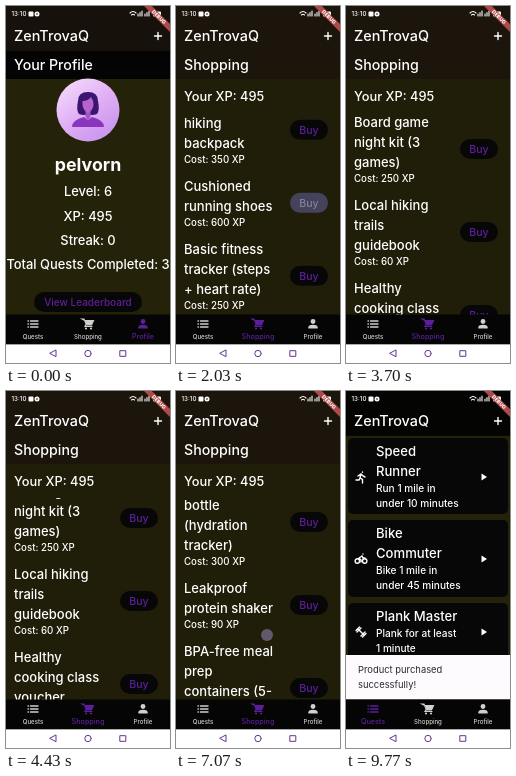
Write an HTML page with a canvas that moves like this. It is 164 by 357 pixels and loops after 9.81 s.

```html
<!DOCTYPE html>
<html lang="en">
<head>
<meta charset="utf-8">
<title>Quest app</title>
<style>
html, body { margin: 0; width: 100%; height: 100%; overflow: hidden; background: #000; }
canvas { display: block; width: 164px; height: 357px; }
</style>
</head>
<body>
<canvas id="stage"></canvas>
<script>
const W = 164, H = 357, LOOP = 9810;
const WHITE = '#fff', PURPLE = '#5c1f9a', BODY = '#201e08', BAR = '#1c150c', DARK = '#080707';
const SHOP_AT = 620, BUY_AT = 8340, QUESTS_AT = 9100;

const products = [
  ['Gratitude|journal & pen|set', 120],
  ['Wireless noise-|canceling|headphones', 500],
  ['Mindfulness|prompt cards', 80],
  ['Lightweight|hiking|backpack', 350],
  ['Cushioned|running shoes', 600],
  ['Basic fitness|tracker (steps|+ heart rate)', 250],
  ['Board game|night kit (3|games)', 250],
  ['Local hiking|trails|guidebook', 60],
  ['Healthy|cooking class|voucher', 350],
  ['3-month habit|tracker planner', 95],
  ['1-month|language|learning|subscription', 170],
  ['Smart water|bottle|(hydration|tracker)', 300],
  ['Leakproof|protein shaker', 90],
  ['BPA-free meal|prep|containers (5-|pack)', 150]
];
// start, end, from, to, finger x, finger y
const flings = [
  [1104, 2300, 0, 252, 99, 303],
  [3000, 4200, 252, 475, 96, 290],
  [4600, 5800, 475, 668, 95, 285],
  [6250, 6900, 668, 890, 93, 290],
  [7040, 7800, 890, 941, 91, 250]
];
const taps = [[SHOP_AT, 82, 320], [BUY_AT, 133, 252], [QUESTS_AT, 27, 320]];

const canvas = document.getElementById('stage');
const c = canvas.getContext('2d');
const dpr = window.devicePixelRatio || 1;
canvas.width = W * dpr;
canvas.height = H * dpr;

const easeOut = p => 1 - (1 - Math.min(1, Math.max(0, p))) ** 3;

function rect(x, y, w, h, color, r = 0) {
  c.fillStyle = color;
  c.beginPath();
  c.roundRect(x, y, w, h, r);
  c.fill();
}
function disc(x, y, r, color) {
  c.fillStyle = color;
  c.beginPath();
  c.arc(x, y, r, 0, 7);
  c.fill();
}
function text(s, x, y, size, color = WHITE, align = 'left', weight = 500) {
  c.font = `${weight} ${size}px Inter, sans-serif`;
  c.textAlign = align;
  c.textBaseline = 'middle';
  c.fillStyle = color;
  c.fillText(s, x, y);
}
function path(d, x, y, color, lineWidth) {
  c.save();
  c.translate(x, y);
  c.lineCap = 'round';
  c.lineWidth = lineWidth;
  c.fillStyle = c.strokeStyle = color;
  const shape = new Path2D(d);
  lineWidth ? c.stroke(shape) : c.fill(shape);
  c.restore();
}

function statusBar() {
  text('13:10', 5.5, 8, 6.2);
  rect(22.5, 5.5, 5, 5, WHITE, 1);
  disc(31, 8, 2.5, WHITE);
  disc(31, 8, 0.8, DARK);
  path('M-3 -1Q0 -4 3 -1M-1.5 1Q0 -.5 1.5 1', 127, 8, WHITE, 1.1);
  path('M0 2V0M2 2V-1.5M4 2V-3', 132, 8, WHITE, 1.1);
  path('M0 2V0M2 2V-1.5M4 2V-3', 139, 8, WHITE, 1.1);
  rect(147, 5.5, 8, 5, WHITE, 1);
}

function debugRibbon() {
  c.save();
  c.translate(W, 0);
  c.rotate(Math.PI / 4);
  rect(-18.5, 12.8, 37, 5.6, '#b04a4a');
  text('DEBUG', 0, 15.8, 5, WHITE, 'center', 800);
  c.restore();
}

function header(bar, title, band) {
  rect(0, 0, W, 45, bar);
  text('ZenTrovaQ', 8, 30.5, 14.4);
  path('M-3.5 0H3.5M0 -3.5V3.5', 152, 30, WHITE, 1.4);
  if (title) {
    rect(0, 45, W, 28, band);
    text(title, 8, 59.5, 14.2);
  }
}

function avatar() {
  const glow = c.createLinearGradient(60, 75, 104, 134);
  glow.addColorStop(0, '#f3d9fb');
  glow.addColorStop(0.5, '#e0aef4');
  glow.addColorStop(1, '#c592ee');
  disc(82, 104, 31.5, glow);
  const robe = c.createLinearGradient(66, 108, 98, 122);
  robe.addColorStop(0, '#8a35c0');
  robe.addColorStop(1, '#3c1c88');
  path('M-9 8Q-12 4 -10 -5Q-10 -14 0 -14Q10 -14 10 -5Q12 4 9 8Q4 10 0 8Q-4 10 -9 8Z', 82, 100, '#3a1670');
  path('M-16 8Q-16 1 -4 -2L0 1L4 -2Q16 1 16 8Z', 82, 113, robe);
  path('M-2.5 5V12L0 15L2.5 12V5Z', 82, 99, '#a552c4');
  path('M-5.5 -4Q0 -4 3 -8Q5.5 -5 5.5 0Q4.5 6 0 8Q-4.5 6 -5.5 0Z', 82, 99, '#b862d0');
}

function profilePage() {
  rect(0, 45, W, 264, '#25220a');
  header('#16110b', 'Your Profile', '#050404');
  avatar();
  text('pelvorn', 82, 159.5, 17.8, WHITE, 'center', 700);
  ['Level: 6', 'XP: 495', 'Streak: 0', 'Total Quests Completed: 3'].forEach((s, i) =>
    text(s, 82, 186.5 + i * 24.3, 12.9, WHITE, 'center'));
  rect(28, 286, 108, 20, DARK, 10);
  text('View Leaderboard', 82, 296.5, 10, PURPLE, 'center');
}

function shoppingPage(t) {
  const xp = t < BUY_AT + 60 ? 495 : 345;
  let scroll = 0;
  for (const [start, end, from, to] of flings)
    if (t >= start) scroll = from + (to - from) * easeOut((t - start) / (end - start));
  rect(0, 45, W, 264, BODY);
  header(BAR, 'Shopping', BAR);
  text(`Your XP: ${xp}`, 8, 91.5, 12.8);
  c.save();
  c.beginPath();
  c.rect(0, 107, W, 202);
  c.clip();
  let y = 117 - scroll;
  for (const [name, cost] of products) {
    const lines = name.split('|'), n = lines.length;
    lines.forEach((line, i) => text(line, 8, y + i * 20 + 1.2, 13));
    text(`Cost: ${cost} XP`, 8, y + n * 20 - 2.7, 9.7);
    const off = cost > xp, mid = y + n * 10 - 3;
    rect(114, mid - 10, 38, 20, off ? '#45425c' : DARK, 10);
    text('Buy', 133, mid + 0.5, 10.6, off ? '#85819a' : PURPLE, 'center');
    y += n * 20 + 23;
  }
  c.restore();
}

function questCard(y, h, titles, notes, icon) {
  rect(2, y, 160, h, DARK, 5);
  titles.forEach((s, i) => text(s, 30, y + 14.3 + i * 20, 13.1));
  notes.forEach((s, i) => text(s, 30, y + 11.3 + titles.length * 20 + i * 15, 10.1));
  const mid = y + (titles.length > 1 ? 39 : 29);
  path(icon, 15, mid, WHITE, 1.4);
  path('M-2.5 -3.5L3 0L-2.5 3.5Z', 138, mid, WHITE);
}

function questsPage() {
  rect(0, 45, W, 264, '#242208');
  header('#040403');
  questCard(47, 76, ['Speed', 'Runner'], ['Run 1 mile in', 'under 10 minutes'],
    'M1.5 -5V-4.8M-3 -1L0 -3L2 -1L4 0M0 -3L-1 1L1.5 2.5V6M-1 1L-2 3L-5 3');
  questCard(129, 77, ['Bike', 'Commuter'], ['Bike 1 mile in', 'under 45 minutes'],
    'M-1.5 2A2.2 2.2 0 1 1 -5.9 2A2.2 2.2 0 1 1 -1.5 2M5.9 2A2.2 2.2 0 1 1 1.5 2A2.2 2.2 0 1 1 5.9 2M0 3V1L-2 -1L1 -3L2 -1H4M2 -5V-4.9');
  questCard(212, 92, ['Plank Master'], ['Plank for at least', '1 minute'],
    'M-2.5 -2.5L2.5 2.5M-5 -1.5L-1.5 -5M-4 0L0 -4M5 1.5L1.5 5M4 0L0 4');
}

function snackbar(t) {
  const shown = easeOut((t - BUY_AT - 60) / 250);
  if (!shown) return;
  c.save();
  c.beginPath();
  c.rect(0, 264, W, 44.5);
  c.clip();
  c.translate(0, 45 * (1 - shown));
  rect(0, 264, W, 45, '#fdfbfe');
  text('Product purchased', 12, 279.5, 9.4, '#2c2834', 'left', 400);
  text('successfully!', 12, 294, 9.4, '#2c2834', 'left', 400);
  c.restore();
}

function navBar(selected) {
  rect(0, 308.5, W, 30, '#060505');
  ['Quests', 'Shopping', 'Profile'].forEach((label, i) => {
    const x = 27 + i * 55, on = i === selected, color = on ? PURPLE : '#d2d0cc';
    if (i === 0) path('M-5 -3H-4.6M-2.5 -3H5M-5 0H-4.6M-2.5 0H5M-5 3H-4.6M-2.5 3H5', x, 318, color, 1.4);
    if (i === 1) {
      path('M-6 -5H-4L-1.5 1H3.5L5.5 -3.5H-3.3ZM-2 .5L-3 2.5H4', x, 318, color, 1.2);
      path('M-3 -3.5H5.5L3.5 1H-1.5Z', x, 318, color);
      disc(x - 2, 322.5, 1.1, color);
      disc(x + 3, 322.5, 1.1, color);
    }
    if (i === 2) {
      disc(x, 315.5, 2.4, color);
      path('M-4.7 4.5V3Q-4 .8 0 .8Q4 .8 4.7 3V4.5Z', x, 318, color);
    }
    text(label, x, 331, on ? 7.2 : 6.1, color, 'center');
  });
  rect(0, 338.5, W, 19, '#fff');
  path('M3 -3.2V3.2L-3 0Z', 47, 347.5, '#63358c', 1);
  path('M3.2 0A3.2 3.2 0 1 1 -3.2 0A3.2 3.2 0 1 1 3.2 0', 82, 347.5, '#63358c', 1);
  path('M-2.8 -2.8H2.8V2.8H-2.8Z', 117, 347.5, '#63358c', 1);
}

function touches(t) {
  const dot = (x, y) => disc(x, y, 6, 'rgba(132,122,160,.65)');
  for (const [start, end, from, to, x, y] of flings) {
    const p = (t - start) / (end - start);
    if (p >= 0 && p < 0.18) dot(x, y - (to - from) * easeOut(p));
  }
  for (const [at, x, y] of taps) if (Math.abs(t - at) < 60) dot(x, y);
}

function draw(t) {
  c.setTransform(dpr, 0, 0, dpr, 0, 0);
  const page = t < SHOP_AT ? 2 : t < QUESTS_AT ? 1 : 0;
  if (page === 2) profilePage();
  else if (page === 1) shoppingPage(t);
  else questsPage();
  statusBar();
  debugRibbon();
  snackbar(t);
  navBar(page);
  touches(t);
}

function tick() {
  draw(performance.now() % LOOP);
  requestAnimationFrame(tick);
}
tick();
</script>
</body>
</html>
```
